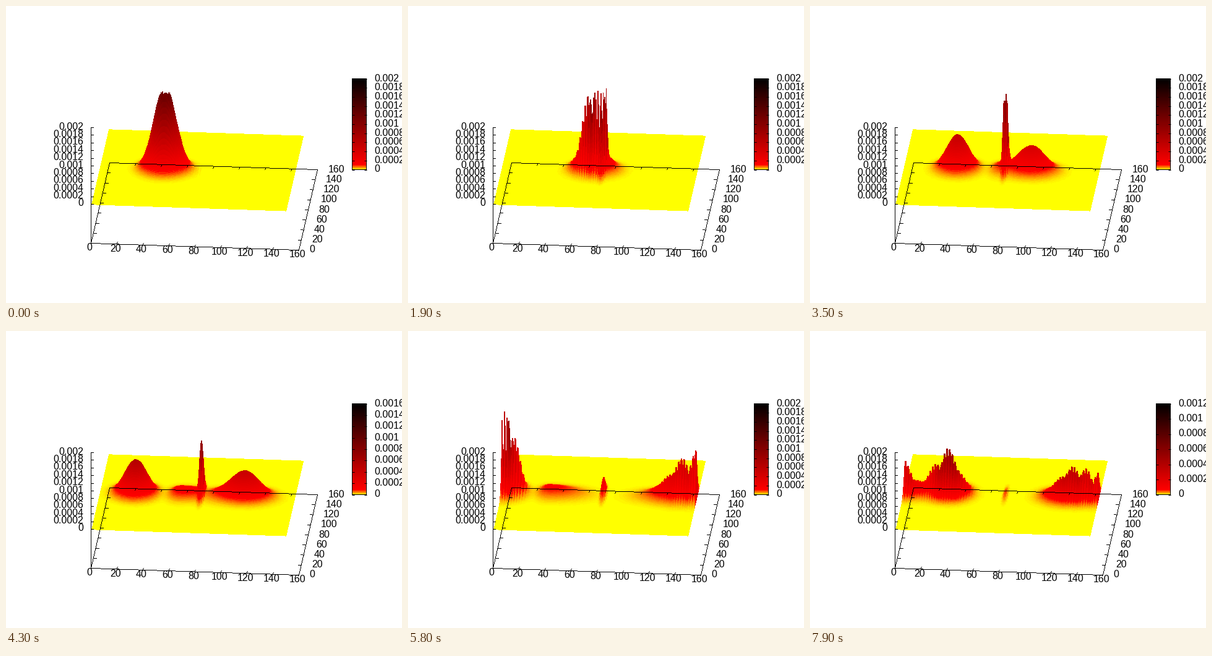
Animation, 640 px wide and 480 px high, one loop 8000 ms. Source, as a matplotlib script:

```python
import numpy as np
import matplotlib.pyplot as plt
from matplotlib.animation import FuncAnimation
from matplotlib.colors import LinearSegmentedColormap

W, H, DPI = 640, 480, 100
FRAMES, STEP = 80, 100
SIZE, WELL, TOP = 150, 78, 0.002
K = 1.45            # wave number of the packets
SHADE = 0.62        # how far up the palette the surface reaches

fire = LinearSegmentedColormap.from_list(
    "fire", [(0, "#ffff00"), (0.055, "#ff0000"), (1, "#000000")], N=512)

plt.rcParams["font.family"] = "Liberation Sans"
fig = plt.figure(figsize=(W / DPI, H / DPI), dpi=DPI, facecolor="white")
ax = fig.add_axes([0, 0, 1, 1])
ax.axis("off")

x = np.arange(SIZE + 1.0)
y = x[::-1]                      # far rows are painted first
gx, gy = np.meshgrid(x, y)


def project(px, py, pz):
    """Oblique view of the surface; pz is in data units."""
    return (138 + 2.1 * px + 0.1875 * py,
            321.2 + 0.069 * px - 0.8125 * py - 62300 * pz)


def floor(px, py):
    return 137 + 2.1 * px + 0.1875 * py, 383 + 0.069 * px - 0.8125 * py


def packet(pos, c, peak, lead, trail, way):
    d = (pos - c) * way
    s = np.where(d > 0, lead, trail)
    return np.sqrt(peak) * np.exp(-(d / (2 * s)) ** 2 + 1j * way * K * pos)


def density(t):
    """Probability along x: incoming, reflected, trapped and leaking parts."""
    def going_left(pos):
        peak = np.interp(t, [27, 50, 68], [0.0009, 0.00086, 0.0008])
        back = packet(pos, 55 - 1.72 * (t - 27), peak, 8.3, 8.5, -1)
        echo = packet(pos, 50 - 1.72 * (t - 50), 0.00021, 6.5, 18, -1)
        return 1j * echo - back * np.exp(2j * K * 76)

    def going_right(pos):
        peak = np.interp(t, [27, 50, 68], [0.00065, 0.00068, 0.00055])
        s = np.interp(t, [27, 50], [9.5, 11.3])
        return (packet(pos, 85 + 1.67 * (t - 27), peak, s, s + 0.5, 1)
                + 1j * packet(pos, 101 + 1.67 * (t - 50), 0.00007, 9, 13, 1))

    inc = packet(x, 50 + 1.72 * t, 0.00216, 8.4, 8.4, 1)
    left = inc + going_left(x) - going_left(-x)
    right = going_right(x) - going_right(2 * SIZE - x)
    rho = np.abs(np.where(x < WELL, left, right)) ** 2
    trapped = 0.0047 * np.exp(-0.075 * (t - 27)) / (1 + np.exp((17 - t) / 2))
    near = np.exp(-((x - WELL) / 1.6) ** 2)
    return rho * (1 - near) + trapped * near


ink = np.zeros((H, W, 4))


def line(p, q):
    """One-pixel line without smoothing."""
    n = int(max(abs(q[0] - p[0]), abs(q[1] - p[1])) + 0.5) + 1
    cols = np.floor(np.linspace(p[0], q[0], n) + 0.5).astype(int)
    rows = np.floor(np.linspace(p[1], q[1], n) + 0.5).astype(int)
    ink[rows, cols, 3] = 1


def label(px, mid, text, ha):
    return ax.text(px, mid + 5.7, text, ha=ha, va="baseline",
                   fontsize=16 * 72 / DPI, color="black", zorder=6)


def num(v):
    return f"{v:.4f}".rstrip("0").rstrip(".")


def draw_axes():
    corners = [floor(0, 0), floor(160, 0), floor(160, 160), floor(0, 160)]
    for p, q in zip(corners, corners[1:] + corners[:1]):
        line(p, q)
    line((137, 196), (137, 383))
    for i in range(9):
        v = 20 * i
        for yy, dy in ((0, -3), (160, 3)):
            p = floor(v, yy)
            line(p, (p[0] - dy * 0.23, p[1] + dy))
        for xx, dx in ((0, 5), (160, -5)):
            p = floor(xx, v)
            line(p, (p[0] + dx, p[1] + dx * 0.033))
        label(135 + 42 * i, 389.6 + 1.38 * i, str(v), "center")
        label(490.4 + 3.75 * i, 392.6 - 16.2 * i, str(v), "left")
    for i in range(11):
        ty = 320 - 12.4 * i
        line((137, ty), (141, ty))
        label(125.5, 317.6 - 12.35 * i, num(i * 0.0002), "right")


def draw_bar():
    box = [(559, 117), (582, 117), (582, 264), (559, 264)]
    for p, q in zip(box, box[1:] + box[:1]):
        line(p, q)
    ax.imshow(np.linspace(1, 0, 147)[:, None], cmap=fire, vmin=0, vmax=1,
              extent=(559, 583, 265, 117), aspect="auto",
              interpolation="nearest", zorder=3)


draw_axes()
draw_bar()
ax.imshow(ink, extent=(0, W, H, 0), aspect="auto",
          interpolation="nearest", zorder=5)
ax.set_xlim(0, W)
ax.set_ylim(H, 0)
ax.set_autoscale_on(False)
scale_parts = []
surface = None


def draw_scale(top, step):
    while scale_parts:
        scale_parts.pop().remove()
    n = int(round(top / step))
    for i in range(n + 1):
        ty = 264.5 - 147 * i / n
        scale_parts.append(label(595.5, ty - 1.7, num(i * step), "left"))
        for a, b in ((559, 563), (579, 583)):
            scale_parts.extend(ax.plot([a, b], [ty, ty], color="black",
                                       lw=0.72, zorder=5,
                                       solid_capstyle="butt"))


def draw(t):
    global surface
    if surface is not None:
        surface.remove()
    sy = 8.5 + 0.012 * t
    z = density(t)[None, :] * np.exp(-((gy - 75) / sy) ** 2 / 2)

    peak = min(z.max(), TOP)
    step = 0.0001 if peak <= 0.001 else 0.0002
    top = np.ceil(peak / step - 1e-6) * step
    draw_scale(top, step)

    quads = np.stack([z[:-1, :-1], z[1:, :-1], z[:-1, 1:], z[1:, 1:]])
    tone = np.ma.masked_where(quads.max(axis=0) > TOP, quads.mean(axis=0))
    px, py = project(gx, gy, z)
    surface = ax.pcolormesh(px, py, tone * SHADE / top, cmap=fire,
                            vmin=0, vmax=1, shading="flat", zorder=2)
    return [surface]


anim = FuncAnimation(fig, draw, frames=FRAMES, interval=STEP,
                     init_func=lambda: [], repeat=True, repeat_delay=0,
                     blit=False)
plt.show()
```
